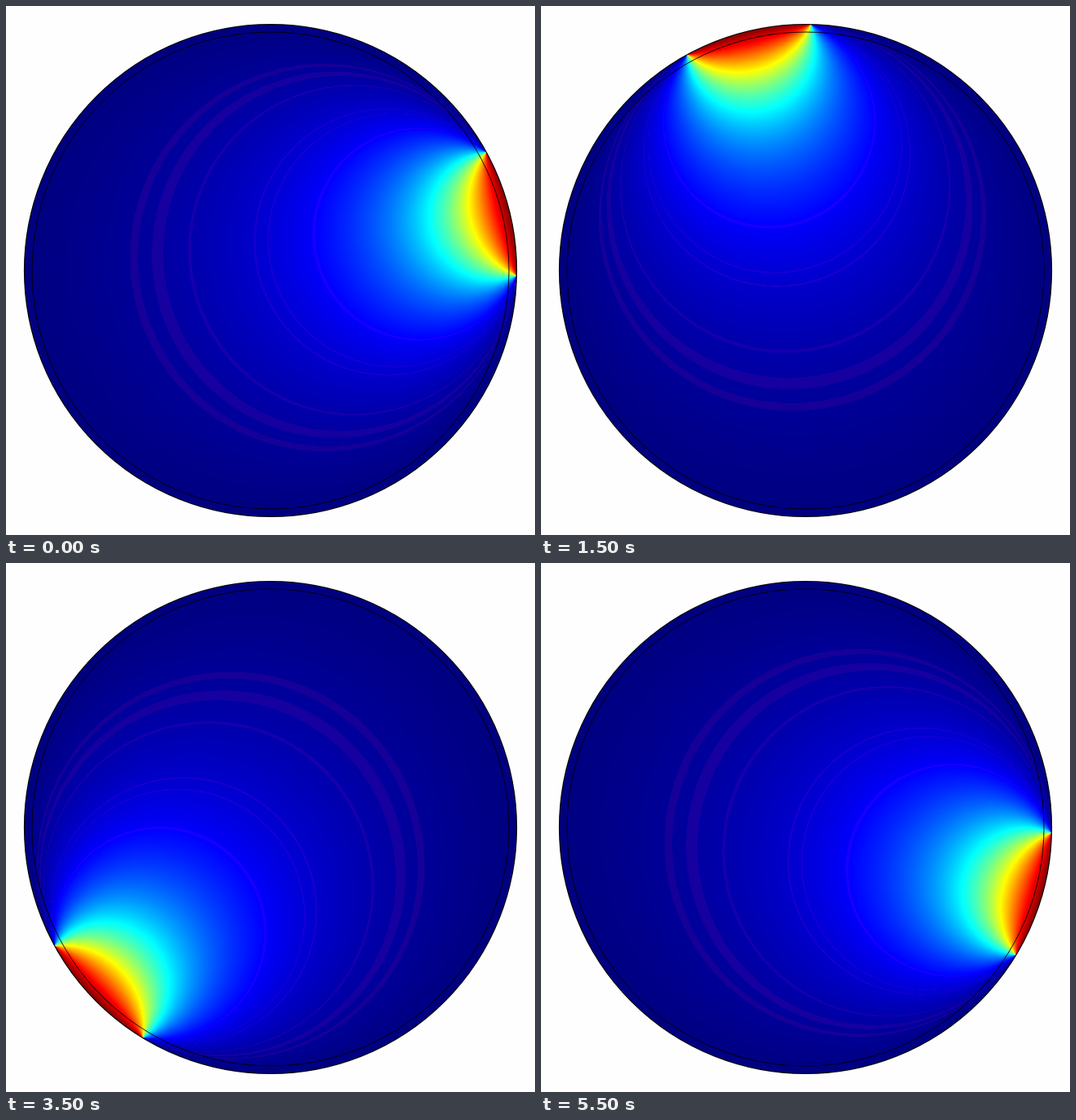
An HTML page with a canvas that plays this animation: 650x650 px, repeating every 6 s.

```html
<!DOCTYPE html>
<html lang="en">
<head>
<meta charset="utf-8">
<title>Rotating boundary potential in a disk</title>
<style>
html, body { margin: 0; width: 100%; height: 100%; overflow: hidden; background: #fefefe; }
canvas { display: block; }
</style>
</head>
<body>
<canvas id="stage" width="650" height="650"></canvas>
<script>
const SIZE = 650, MID = 325, R = 302.5, INNER = 293;
const STEP_MS = 500, STEPS = 12, RAD = Math.PI / 180;
const START = 13.75 * RAD, ARC = 30 * RAD;
// Faint violet contour bands, as ranges of the potential
const BANDS = [[.0235, .0255], [.030, .0335], [.0427, .0438],
               [.0748, .0760], [.0840, .0848], [.1212, .1242]];

const ctx = document.getElementById("stage").getContext("2d");
const img = ctx.createImageData(SIZE, SIZE);

const ramp = v => 255 * Math.max(0, Math.min(1, 1.5 - Math.abs(v)));

// Jet colour scale, sampled once
const LEVELS = 4000;
const jet = Array.from({ length: LEVELS + 1 }, (_, i) => {
  const u = i / LEVELS;
  const tint = BANDS.some(([lo, hi]) => u >= lo && u <= hi) ? 22 : 0;
  return [ramp(4 * u - 3) + tint, ramp(4 * u - 2), ramp(4 * u - 1)];
});

const rim = angle => [MID + R * Math.cos(angle), MID - R * Math.sin(angle)];

function ring(radius, width) {
  ctx.lineWidth = width;
  ctx.beginPath();
  ctx.arc(MID, MID, radius, 0, 2 * Math.PI);
  ctx.stroke();
}

// Harmonic potential: 1 on the arc, 0 on the rest of the rim
function draw(step) {
  const axis = START + step * 30 * RAD;
  const [ax, ay] = rim(axis + ARC / 2), [bx, by] = rim(axis - ARC / 2);
  const data = img.data;
  for (let y = 0, k = 0; y < SIZE; y++) {
    for (let x = 0; x < SIZE; x++, k += 4) {
      const px = x + .5, py = y + .5;
      data[k + 3] = 255;
      if (Math.hypot(px - MID, py - MID) > R) {
        data[k] = data[k + 1] = data[k + 2] = 254;
        continue;
      }
      const ux = ax - px, uy = ay - py, vx = bx - px, vy = by - py;
      let view = Math.atan2(ux * vy - uy * vx, ux * vx + uy * vy);
      if (view < 0) view += 2 * Math.PI;
      const u = Math.max(0, Math.min(1, view / Math.PI - ARC / (2 * Math.PI)));
      const c = jet[Math.round(u * LEVELS)];
      data[k] = c[0];
      data[k + 1] = c[1];
      data[k + 2] = c[2];
    }
  }
  ctx.putImageData(img, 0, 0);
  ctx.strokeStyle = "#000";
  ring(R, 1.2);
  ring(INNER, 0.9);
}

let shown = -1;
const began = performance.now();
function tick() {
  const step = Math.floor((performance.now() - began) / STEP_MS) % STEPS;
  if (step !== shown) draw(shown = step);
  requestAnimationFrame(tick);
}
tick();
</script>
</body>
</html>
```
